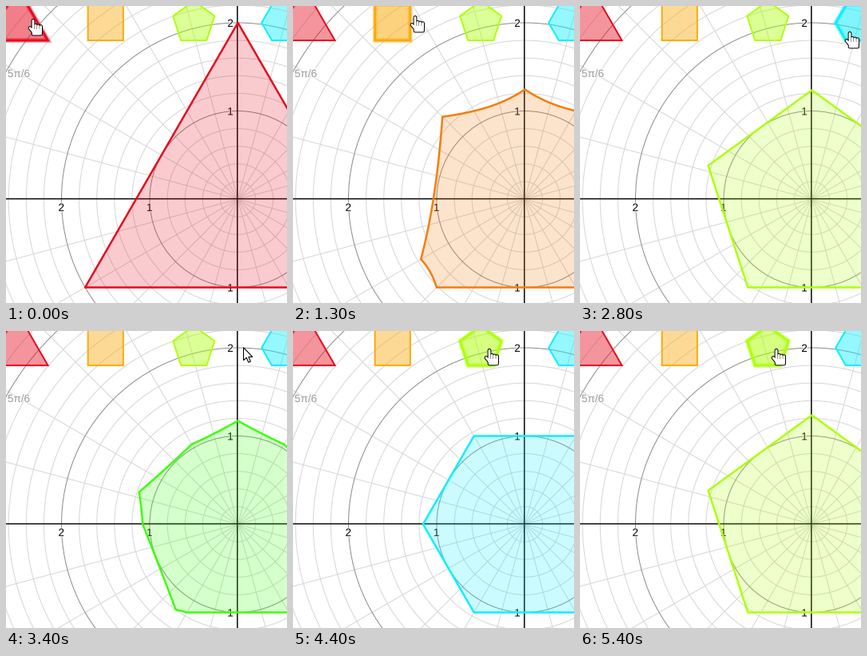
Write a matplotlib script that moves like this. It is 352 px wide and 372 px high and loops after 5500 ms.

```python
import colorsys

import numpy as np
import matplotlib.pyplot as plt
from matplotlib.animation import FuncAnimation
from matplotlib.patches import Circle, Polygon
from matplotlib.patheffects import withStroke

W, H, DPI = 352, 372, 100
FRAMES, STEP = 55, 100
CX, CY, UNIT = 290.5, 242, 110.5
PX = 72 / DPI

plt.rcParams["font.family"] = "Liberation Sans"
plt.rcParams["path.snap"] = False

# Hue in degrees and brightness, by number of sides
HUES = {3: (-5, 0.9), 4: (40, 0.98), 5: (80, 1), 6: (184, 1)}
SATURATION, FILL = 0.95, 0.21
ICON_R = 0.2

# Start of each morph in ms and the number of sides it leads to
MORPHS = [(780, 4), (1950, 5), (3105, 6), (4450, 5)]
MORPH_MS = 800

# Pointer stops: arrival in ms and place of the tip
STOPS = [(0, 34, 16), (1100, 153, 12), (1800, 236, 16),
         (2700, 338, 32), (3680, 246, 22)]
MOVE_MS, LIFT = 500, 7

ANGLES = np.radians(np.arange(0, 360, 0.5))


def radius(sides):
    """Polar radius of a regular polygon around the unit circle, flat at the bottom."""
    sector = 2 * np.pi / sides
    turn = (ANGLES + np.pi / 2 + sector / 2) % sector - sector / 2
    return 1 / np.cos(turn)


def outline(r, x=0, y=0):
    return np.column_stack([CX + UNIT * (x + r * np.cos(ANGLES)),
                            CY - UNIT * (y + r * np.sin(ANGLES))])


def rgb(hue, value):
    return colorsys.hsv_to_rgb(hue / 360 % 1, SATURATION, value)


def ease(u):
    u = min(u, 1)
    return 2 * u * u if u < 0.5 else 1 - 2 * (1 - u) ** 2


def mix(a, b, t):
    return np.asarray(a) + (np.asarray(b) - np.asarray(a)) * t


def hand_strokes():
    """Hand as strokes: four fingers, thumb and palm, parted by gaps."""
    fingers = [((3.2 * k, 2.2 if k == 0 else 7.5 + 0.7 * k), (3.2 * k, 16))
               for k in range(4)]
    palm = [((0, y), (9.6, y)) for y in (14.5, 17, 19)]
    thumb = [((-4, 11.5), (0, 16))]
    gap = (np.nan, np.nan)
    return np.array([p for a, b in fingers + palm + thumb for p in (a, b, gap)])


HAND = hand_strokes()
ARROW = np.array([(0, 0), (0, 16), (3.8, 12.6), (6.2, 18.5), (8.8, 17.4),
                  (6.3, 11.7), (11.3, 11.7)])

fig = plt.figure(figsize=(W / DPI, H / DPI), dpi=DPI, facecolor="white")
ax = fig.add_axes([0, 0, 1, 1])
ax.set_xlim(0, W)
ax.set_ylim(H, 0)
ax.axis("off")


def draw_line(xs, ys, color, width, z):
    ax.plot(xs, ys, color=color, lw=width * PX, zorder=z, snap=False)


def draw_grid():
    for a in np.radians(np.arange(0, 360, 15)):
        draw_line([CX, CX + W * 2 * np.cos(a)], [CY, CY - W * 2 * np.sin(a)],
                  "#d6d6d6", 1, 1)
    for k in range(1, 18):
        major = k % 5 == 0
        ax.add_patch(Circle((CX, CY), k * UNIT / 5, fill=False, lw=PX,
                            ec="#8c8c8c" if major else "#d6d6d6",
                            zorder=2 if major else 1))
    draw_line([0, W], [CY - 0.5] * 2, "black", 1.4, 3)
    draw_line([CX - 0.7] * 2, [0, H], "black", 1.4, 3)


def label(x, y, text, color="black"):
    ax.text(x, y, text, color=color, fontsize=13.5 * PX, ha="center",
            va="center_baseline", zorder=4,
            path_effects=[withStroke(linewidth=2 * PX, foreground="white")])


def draw_labels():
    for v in (2, 1, -1):
        label(281, CY - v * UNIT - 0.5, str(abs(v)))
    for v in (2, 1):
        label(CX - v * UNIT - 0.3, CY + 9.3, str(v))
    label(16, 83.5, "5π/6", "#9a9a9a")


def make_icon(sides):
    x = sides - 5.5
    pts = outline(ICON_R * radius(sides), x, 2)
    color = rgb(*HUES[sides])
    glow = Polygon(pts, fc="none", ec=(*color, 0.35), lw=6 * PX, zorder=5)
    body = Polygon(pts, ec=color, zorder=6, joinstyle="miter")
    for patch in (glow, body):
        patch.set_snap(False)
        ax.add_patch(patch)
    return CX + UNIT * x, glow, body, color


draw_grid()
draw_labels()
icons = [make_icon(sides) for sides in HUES]
shape = Polygon([(0, 0)], zorder=5, lw=2.5 * PX, joinstyle="round", snap=False)
arrow = Polygon([(0, 0)], zorder=9, fc="white", ec="black", lw=1.1 * PX)
ax.add_patch(shape)
ax.add_patch(arrow)
hand = [ax.plot([], [], color=color, lw=width * PX, zorder=9,
                solid_capstyle="round")[0]
        for color, width in (("black", 4.8), ("white", 2.8))]


def update_shape(ms):
    old, new, t = 3, 3, 1
    for start, sides in MORPHS:
        if ms >= start:
            old, new, t = new, sides, ease((ms - start) / MORPH_MS)
    color = rgb(*mix(HUES[old], HUES[new], t))
    shape.set_xy(outline(mix(radius(old), radius(new), t)))
    shape.set_facecolor((*color, FILL))
    shape.set_edgecolor(color)


def pointer_tip(ms):
    tip = np.array(STOPS[0][1:], float)
    for arrival, *place in STOPS[1:]:
        t = np.clip((ms - arrival) / MOVE_MS + 1, 0, 1)
        tip = mix(tip, place, t) - (0, LIFT * np.sin(np.pi * t))
    return tip


def update_pointer(ms):
    tip = pointer_tip(ms)
    over_any = False
    for x, glow, body, color in icons:
        over = abs(tip[0] - x) < 33
        over_any |= over
        glow.set_visible(over)
        body.set_facecolor((*color, 0.53 if over else 0.43))
        body.set_linewidth((3 if over else 2) * PX)
    arrow.set_xy(ARROW + tip)
    arrow.set_visible(not over_any)
    for line in hand:
        line.set_data(*(HAND + tip).T)
        line.set_visible(over_any)


def update(frame):
    ms = frame * STEP
    update_shape(ms)
    update_pointer(ms)
    return []


anim = FuncAnimation(fig, update, frames=FRAMES, interval=STEP,
                     repeat=True, repeat_delay=0, blit=False)
plt.show()
```
